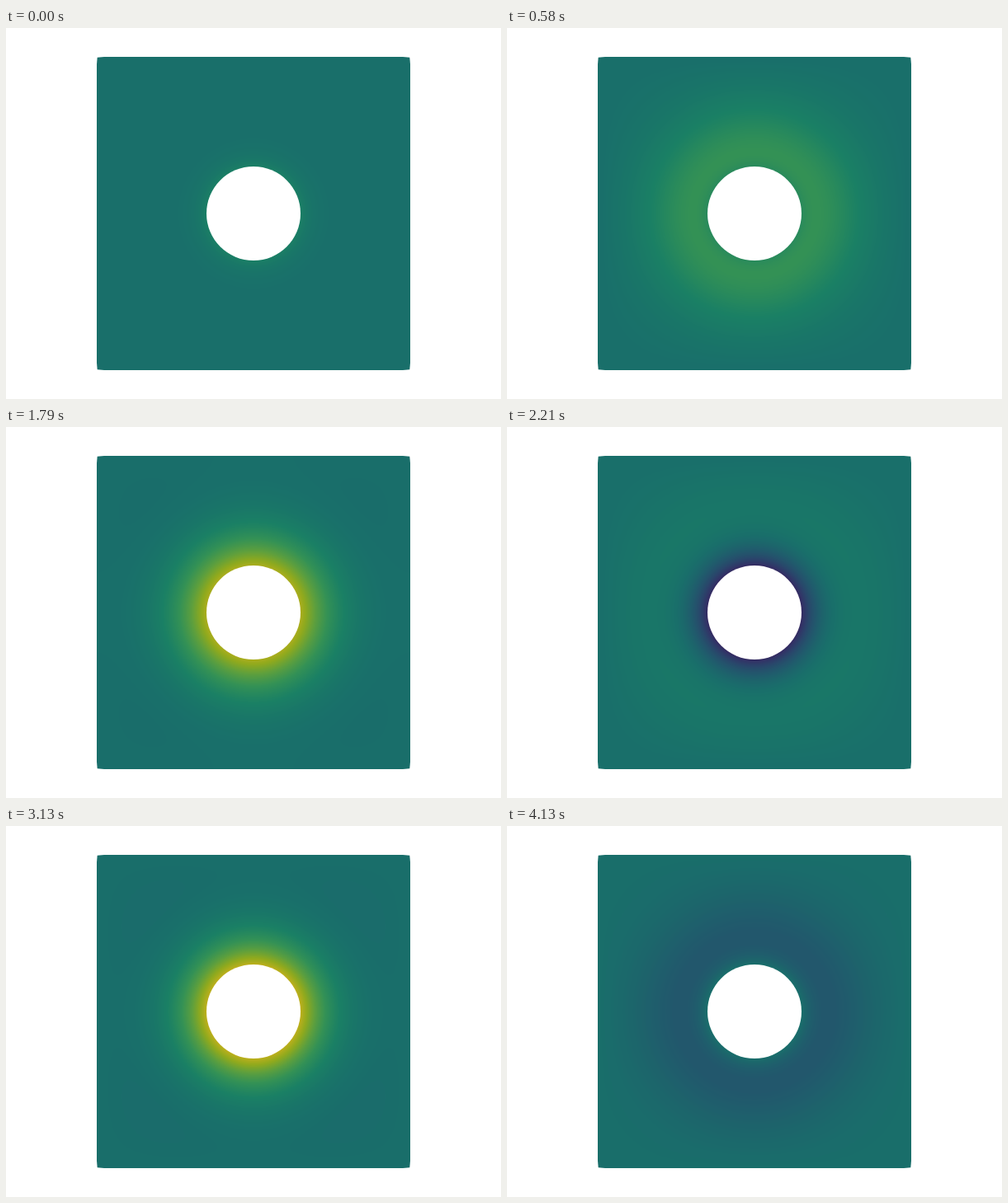
An HTML page with a canvas that plays this animation: 600 by 450 pixels, repeating every 4170 ms.

```html
<!DOCTYPE html>
<html lang="en">
<head>
<meta charset="utf-8">
<title>Pulsing heat around a hole</title>
<style>
  html, body { margin: 0; width: 100%; height: 100%; overflow: hidden; background: #fff; }
  canvas { display: block; }
</style>
</head>
<body>
<canvas id="stage" width="600" height="450"></canvas>
<script>
const LOOP = 4170, STEPS = 100, CYCLES = 3;
const CX = 300, CY = 225, HALF = 190, HOLE = 57;
const CELL = 2, N = HALF / CELL, W = N + 1;
const DIFFUSION = 225 / (CELL * CELL);   // cells squared per step
const SWEEPS = 50, RELAX = 1.83, SHADE = 0.76;

const stops = ['440154', '482475', '414487', '355f8d', '2a788e', '21918c',
               '22a884', '44bf70', '7ad151', 'bddf26', 'fde725']
  .map(hex => [0, 2, 4].map(i => parseInt(hex.slice(i, i + 2), 16)));

const palette = Array.from({ length: 256 }, (_, i) => {
  const p = i / 255 * (stops.length - 1);
  const k = Math.min(Math.floor(p), stops.length - 2);
  return stops[k].map((c, j) => Math.round(SHADE * (c + (stops[k + 1][j] - c) * (p - k))));
});

// Implicit heat steps on one quadrant; the outer sides are held at 0.
function solve() {
  const free = [], rim = [];
  for (let y = 0; y < N; y++) {
    for (let x = 0; x < N; x++) {
      const gap = Math.hypot(x, y) * CELL - HOLE;
      const i = y * W + x;
      if (gap > 0) free.push([i, x ? i - 1 : i + 1, y ? i - W : i + W]);
      else rim.push([i, Math.max(gap, -2 * CELL)]);
    }
  }
  const near = Math.ceil(HOLE / CELL) + 1;
  const diagonal = 1 + 4 * DIFFUSION;
  const frames = [];
  let u = new Float32Array(W * W);
  for (let step = 1; step <= STEPS; step++) {
    const old = u;
    const heat = Math.sin(2 * Math.PI * CYCLES * step / STEPS);
    u = old.slice();
    for (let sweep = 0; sweep < SWEEPS; sweep++) {
      const slope = (u[near] - heat) / (near * CELL - HOLE);
      for (const [i, gap] of rim) u[i] = heat + slope * gap;
      for (const [i, left, up] of free) {
        const sum = u[left] + u[i + 1] + u[up] + u[i + W];
        u[i] += RELAX * ((old[i] + DIFFUSION * sum) / diagonal - u[i]);
      }
    }
    frames.push(u);
  }
  return frames;
}

const frames = solve();
const ctx = document.getElementById('stage').getContext('2d');
const field = document.createElement('canvas');
const SIZE = field.width = field.height = 2 * HALF;
const fieldCtx = field.getContext('2d');
const image = fieldCtx.createImageData(SIZE, SIZE);
image.data.fill(255);

function setPixel(x, y, color) {
  const p = (y * SIZE + x) * 4;
  image.data[p] = color[0];
  image.data[p + 1] = color[1];
  image.data[p + 2] = color[2];
}

function paintField(u) {
  for (let y = 0; y < HALF; y++) {
    const gy = (y + 0.5) / CELL, iy = Math.floor(gy), fy = gy - iy;
    for (let x = 0; x < HALF; x++) {
      const gx = (x + 0.5) / CELL, ix = Math.floor(gx), fx = gx - ix;
      const i = iy * W + ix;
      const top = u[i] + (u[i + 1] - u[i]) * fx;
      const low = u[i + W] + (u[i + W + 1] - u[i + W]) * fx;
      const value = 0.5 + 0.5 * (top + (low - top) * fy);
      const color = palette[Math.max(0, Math.min(255, Math.floor(value * 256)))];
      for (const px of [HALF + x, HALF - 1 - x]) {
        setPixel(px, HALF + y, color);
        setPixel(px, HALF - 1 - y, color);
      }
    }
  }
  fieldCtx.putImageData(image, 0, 0);
}

// Square whose sides draw in slightly at the corners.
const plate = new Path2D();
const tip = HALF - 0.7, bend = HALF - 9;
for (const [a, b] of [[1, 1], [-1, 1], [-1, -1], [1, -1]]) {
  const points = [[HALF, bend], [tip, tip], [bend, HALF]];
  if (a !== b) points.reverse();
  for (const [x, y] of points) plate.lineTo(CX + a * x, CY + b * y);
}
plate.closePath();

function draw(step) {
  paintField(frames[step]);
  ctx.fillStyle = '#fff';
  ctx.fillRect(0, 0, 600, 450);
  ctx.save();
  ctx.clip(plate);
  ctx.drawImage(field, CX - HALF, CY - HALF);
  ctx.restore();
  ctx.beginPath();
  ctx.arc(CX, CY, HOLE, 0, 2 * Math.PI);
  ctx.fill();
}

const start = performance.now();
let shown = -1;

function tick() {
  const time = (performance.now() - start) % LOOP;
  // Steps run at 24 per second, rounded to hundredths.
  const step = Math.min(STEPS - 1, Math.floor((Math.floor(time / 10) + 0.49) * 0.24));
  if (step !== shown) draw(shown = step);
  requestAnimationFrame(tick);
}
tick();
</script>
</body>
</html>
```
